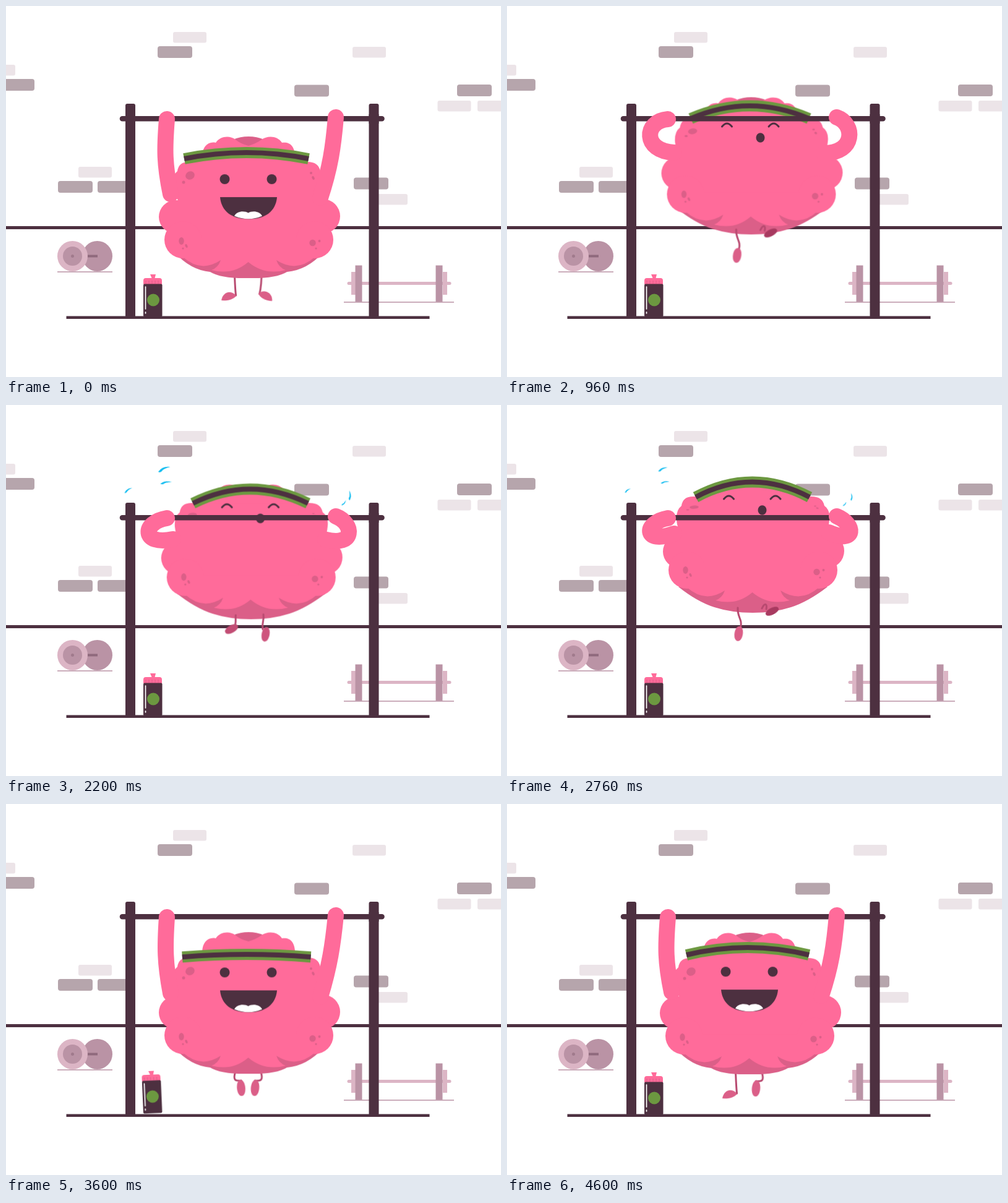
An HTML page without scripts that plays this animation: 800 by 600 pixels, repeating every 4640 ms.

```html
<!DOCTYPE html>
<html lang="en">
<head>
<meta charset="utf-8">
<title>Pull-ups</title>
<style>
  html, body { margin: 0; width: 100%; height: 100%; overflow: hidden; background: #fff; }
  svg { display: block; width: 800px; height: 600px; }
  .ink { fill: #4d3040; }
  .pink { fill: #ff6b9a; }
  .rose { fill: #db5f88; }
  .mauve { fill: #ba93a5; }
  .pale { fill: #dcb5c5; }
  .line { fill: none; stroke: #4d3040; }
  .limb { fill: none; stroke: #b84a70; stroke-width: 3; stroke-linecap: round; }
  .arm { fill: none; stroke: #ff6b9a; stroke-width: 26; stroke-linecap: round; }
  .anim { animation: 4.64s linear infinite; }

  .body { animation-name: body; }
  @keyframes body {
    0%, 100% { transform: none; }
    5% { transform: translate(0, 12px); }
    13.4% { transform: translate(0, 13px); animation-timing-function: ease-in-out; }
    18.1% { transform: translate(2.5px, -66px); }
    20.69% { transform: translate(2.5px, -70.5px); }
    35.34% { transform: translate(2.5px, -83px); }
    59.48% { transform: translate(5px, -104px); }
    62.5% { transform: translate(5px, -107px); animation-timing-function: ease-in-out; }
    67.5% { transform: translate(0, 40px); }
    70.69% { transform: translate(0, 35px); animation-timing-function: ease-in-out; }
    78% { transform: translate(0, -4px); animation-timing-function: ease-in-out; }
    86.21% { transform: translate(0, 9.5px); animation-timing-function: ease-in-out; }
    95% { transform: translate(0, -5px); }
    99.14% { transform: translate(0, -3px); }
  }

  .face { animation-name: face; }
  @keyframes face {
    0%, 100%, 70.69% { transform: none; }
    5%, 13.4%, 86.21% { transform: translate(0, 16px); }
    18.1%, 20.69% { transform: translate(1.5px, -15.5px); }
    35.34% { transform: translate(1.5px, -19px); }
    59.48%, 62.5% { transform: translate(2px, -25px); }
    67.5% { transform: translate(0, 5px); }
    78% { transform: translate(0, -4px); }
    95% { transform: translate(0, -8px); }
    99.14% { transform: translate(0, -6px); }
  }

  .band { animation-name: band; }
  @keyframes band {
    0%, 100%, 67.5%, 70.69% { d: path("M288 247Q389 227 489 247"); }
    5%, 13.4%, 86.21% { d: path("M281 256.5Q389 262.5 497 256.5"); }
    18.1%, 20.69% { d: path("M294.5 252.5Q389.5 211.5 485.5 252.5"); }
    35.34% { d: path("M296.5 252Q389.5 209 484.5 252"); }
    59.48%, 62.5% { d: path("M300 253Q391 204 484 253"); }
    95%, 99.14% { d: path("M290 247Q389 223 488 247"); }
  }

  .crown { animation-name: crown; transform-origin: 392px 211px; }
  @keyframes crown {
    0%, 67.5%, 78%, 95%, 100% { transform: none; }
    5%, 13.4%, 86.21% { transform: scale(1.05, 1.15); }
    20.69% { transform: translate(0, 7px); }
    35.34% { transform: translate(0, 8.5px); }
    59.48%, 62.5% { transform: translate(0, 13px); }
  }

  .belly { animation-name: belly; }
  @keyframes belly {
    0%, 13.4%, 67.5%, 78%, 95%, 100% { transform: none; }
    20.69% { transform: translate(0, -3px); }
    35.34% { transform: translate(0, -4.5px); }
    59.48%, 62.5% { transform: translate(0, -7px); }
    86.21% { transform: translate(0, 1.5px); }
  }

  .spots { animation-name: spots; }
  @keyframes spots {
    0%, 13.4%, 67.5%, 78%, 95%, 100% { transform: none; }
    20.69% { transform: translate(0, -5px); }
    35.34% { transform: translate(0, -7.5px); }
    59.48%, 62.5% { transform: translate(0, -9px); }
    86.21% { transform: translate(0, 2px); }
  }

  .brow { animation-name: brow; transform-origin: 392px 271px; }
  @keyframes brow {
    0%, 13.4%, 67.5%, 100% { transform: none; }
    20.69% { transform: scaleY(.7); }
    35.34% { transform: scaleY(.55); }
    59.48%, 62.5% { transform: translate(0, -3px) scaleY(.4); }
  }

  .under { animation-name: under; }
  @keyframes under {
    0%, 13.4%, 67.5%, 100% { d: path("M272 398Q298 427 330 430Q348 441 392 440Q436 441 454 430Q487 427 513 398Z"); }
    18.1%, 62.5% { d: path("M272 398Q302 422 330 431Q358 440 392 440Q426 440 454 431Q482 422 513 398Z"); }
  }

  .left { animation-name: left; }
  @keyframes left {
    0%, 78%, 95%, 99.14%, 100% { d: path("M260 183C256 232 256 256 266 304"); }
    5%, 13.4%, 86.21% { d: path("M260 183C255 235 255 262 268 314"); }
    18.1%, 20.69% { d: path("M260 183C221 186 219 235 270 237"); }
    35.34% { d: path("M260 183C219 189 217 230 270 226"); }
    59.48%, 62.5% { d: path("M260 183C221 190 219 226 270 208"); }
    67.5%, 70.69% { d: path("M260 183C268 225 270 265 266 340"); }
  }

  .right { animation-name: right; }
  @keyframes right {
    0%, 78%, 95%, 99.14%, 100% { d: path("M533 180C529 228 524 262 508 310"); }
    5%, 13.4%, 86.21% { d: path("M533 180C531 225 526 264 508 319"); }
    18.1%, 20.69% { d: path("M533 180C562 190 564 238 512 238"); }
    35.34% { d: path("M533 180C562 190 564 234 512 229"); }
    59.48%, 62.5% { d: path("M533 180C562 192 566 226 520 206"); }
    67.5%, 70.69% { d: path("M533 180C517 220 509 250 509 340"); }
  }

  .smile, .strain, .dangle, .kick, .tuck { animation-timing-function: step-end; }
  .smile { animation-name: smile; }
  @keyframes smile { 0%, 76%, 100% { opacity: 1; } 11% { opacity: 0; } }
  .strain { animation-name: strain; }
  @keyframes strain { 0%, 76%, 100% { opacity: 0; } 11% { opacity: 1; } }
  .dangle { animation-name: dangle; }
  @keyframes dangle { 0%, 74%, 100% { opacity: 1; } 15.5% { opacity: 0; } }
  .kick { animation-name: kick; }
  @keyframes kick { 0%, 64%, 100% { opacity: 0; } 15.5% { opacity: 1; } }
  .tuck { animation-name: tuck; }
  @keyframes tuck { 0%, 74%, 100% { opacity: 0; } 64% { opacity: 1; } }

  .foot { d: path("M0 -12C9 -12 9 12 0 12C-9 12 -9 -12 0 -12"); fill: #db5f88; }

  .shin { animation-name: shin; }
  @keyframes shin {
    0%, 95%, 100% { d: path("M369 425C370 445 370 455 371.5 468"); }
    99.14% { d: path("M369 425C370 445 370 455 371.5 471"); }
    5%, 13.4%, 78%, 86.21% { d: path("M371 436C366 451 371 452 380 451"); }
  }
  .rest { animation-name: rest; }
  @keyframes rest {
    0%, 95%, 100% { d: path("M-1 -12C6 -5 7 4 6 12C-9 9 -11 -5 -1 -12"); transform: translate(360px, 470px) rotate(90deg); }
    99.14% { d: path("M-1 -12C6 -5 7 4 6 12C-9 9 -11 -5 -1 -12"); transform: translate(360px, 473px) rotate(90deg); }
    5%, 13.4%, 78%, 86.21% { d: path("M0 -13C9 -13 9 13 0 13C-9 13 -9 -13 0 -13"); transform: translate(380px, 463px) rotate(-5deg); }
  }

  /* Legs paddle on a 450 ms beat while climbing */
  .shinL { animation-name: shinL; }
  @keyframes shinL {
    0%, 20.69%, 30.39%, 40.09%, 49.78%, 59.48%, 100% { d: path("M368 432C367 448 376 450 372.5 464"); }
    16%, 25.6%, 35.34%, 45%, 54.7%, 64% { d: path("M367 435C366 426 361 426 360 439"); }
  }
  .footL { animation-name: footL; }
  @keyframes footL {
    0%, 20.69%, 30.39%, 40.09%, 49.78%, 59.48%, 100% { transform: translate(369.5px, 474px) rotate(8deg); fill: #db5f88; }
    16%, 25.6%, 35.34%, 45%, 54.7%, 64% { transform: translate(351.5px, 437px) rotate(115deg) scale(.8, .9); fill: #a83a60; }
  }
  .shinR { animation-name: shinR; }
  @keyframes shinR {
    0%, 20.69%, 30.39%, 40.09%, 49.78%, 59.48%, 100% { d: path("M407 433C411 424 416 424 414 434"); }
    16%, 25.6%, 35.34%, 45%, 54.7%, 64% { d: path("M408 432C414 432 414 440 414 453"); }
    17.5%, 27.2%, 36.9%, 46.6%, 56.3% { d: path("M414 432C415 448 407 450 410 464"); }
  }
  .footR { animation-name: footR; }
  @keyframes footR {
    0%, 20.69%, 30.39%, 40.09%, 49.78%, 59.48%, 100% { transform: translate(423.5px, 437.5px) rotate(63deg) scale(.8, .95); fill: #a83a60; }
    16%, 25.6%, 35.34%, 45%, 54.7%, 64% { transform: translate(425.5px, 451px) rotate(12deg) scale(1.35, 1.55); fill: #a83a60; }
    17.5%, 27.2%, 36.9%, 46.6%, 56.3% { transform: translate(413px, 474px) rotate(-8deg); fill: #db5f88; }
  }

  .bottle { animation-name: bottle; transform-origin: 237px 502px; }
  @keyframes bottle {
    0%, 67.5%, 95%, 100% { transform: none; animation-timing-function: ease-out; }
    70.69% { transform: translate(0, -19px); animation-timing-function: ease-in; }
    73.5% { transform: none; }
    76% { transform: translate(0, -5px) rotate(-3deg); }
    79% { transform: rotate(-2deg); }
    86.21% { transform: rotate(2deg); }
    91% { transform: rotate(-1deg); }
  }

  .sweat path { fill: #14bdf0; d: path("M-10 4Q-3 -6 10 -4Q-2 -1 -4 3Q-7 6 -10 4"); }
  .spray { animation-name: spray; }
  @keyframes spray {
    0%, 30%, 42.1%, 54.2%, 100% { transform: translate(30px, 0) scale(0); }
    35.34%, 47.4%, 59% { transform: none; }
    38%, 50%, 61% { transform: translate(-16px, 0) scale(0); }
  }
  .burst { animation-name: burst; }
  @keyframes burst {
    0%, 66%, 100% { transform: translate(30px, 20px) scale(0); }
    70.69% { transform: none; }
    75% { transform: translate(-16px, -8px) scale(0); }
  }
</style>
</head>
<body>
<svg viewBox="0 0 800 600">
  <defs>
    <rect id="brick" width="56" height="19" rx="4"/>
    <rect id="block" width="54" height="17.5" rx="3"/>
  </defs>

  <g fill="#b6a5ac">
    <use href="#brick" x="245" y="65"/><use href="#brick" x="-10" y="118"/>
    <use href="#brick" x="466" y="127.5"/><use href="#brick" x="729" y="127"/>
    <use href="#brick" x="84" y="283"/><use href="#brick" x="148" y="283"/>
    <use href="#brick" x="562" y="277.5"/>
  </g>
  <g fill="#ece4e8">
    <use href="#block" x="270" y="42"/><use href="#block" x="560" y="66"/>
    <use href="#block" x="-39" y="95"/><use href="#block" x="697.5" y="153"/>
    <use href="#block" x="762" y="153"/><use href="#block" x="117" y="260"/>
    <use href="#block" x="595" y="304"/>
  </g>

  <path class="line" stroke-width="5" d="M0 358.5H800"/>

  <g>
    <circle class="mauve" cx="147.5" cy="404.5" r="24.5"/>
    <path d="M131 404.5H148" stroke="#8f6a7d" stroke-width="4"/>
    <circle class="pale" cx="107.5" cy="404.5" r="24.5"/>
    <circle class="mauve" cx="107.5" cy="404.5" r="15.5"/>
    <circle cx="107.5" cy="404.5" r="2.5" fill="#a07a8c"/>
    <path d="M83 430H172M546 479H724" stroke="#ba93a5" stroke-width="1.6"/>
    <path class="pale" d="M558 430h7v37h-7zM706 430h7v37h-7z"/>
    <path d="M554 448.5H717" stroke="#dcb5c5" stroke-width="5" stroke-linecap="round"/>
    <path class="mauve" d="M564.5 419.5h11v59h-11zM694.5 419.5h11v59h-11z"/>
  </g>

  <g class="ink">
    <rect x="193" y="158" width="16" height="346" rx="3"/>
    <rect x="586.5" y="158" width="16" height="346" rx="3"/>
  </g>

  <g class="anim bottle">
    <path class="pink" d="M233 434H242L240.5 440H248Q252 440 252 444V450H222V444Q222 440 226 440H235.500Z"/>
    <path d="M226 444v5m5-5v5m5-5v5m5-5v5m5-5v5" stroke="#db5f88"/>
    <rect class="ink" x="222" y="449.500" width="30.500" height="53" rx="2"/>
    <path d="M225.500 454V490M225.500 495v2" stroke="#fff" stroke-width="1.700" stroke-linecap="round"/>
    <circle cx="238" cy="475.500" r="10" fill="#6c9840"/>
  </g>
  <path class="line" stroke-width="4.500" d="M97.500 503.700H684.500"/>

  <g class="anim body">
    <g class="anim dangle">
      <g id="leg"><path class="limb anim shin"/><path class="foot anim rest"/></g>
      <use href="#leg" transform="translate(782.500) scale(-1 1)"/>
    </g>

    <g class="anim crown">
      <ellipse class="rose" cx="392" cy="226" rx="34" ry="15"/>
      <path class="pink" d="M318 252C314 230 325 218 339 221C346 210 362 209 371 216Q379 223 392 226Q405 222 413 216C423 209 439 210 446 221C460 219 469 228 467 252Z"/>
    </g>

    <path class="rose anim under"/>
    <path class="rose" d="M271 288Q269 300 276 306L283 280ZM514 288Q516 300 509 306L502 280Z"/>
    <path class="pink" d="M298 252Q392 238 487 252Q505 252 508 267Q518 274 516 290Q515 304 508 312H512A27 27 0 0 1 512 368L490 402H295L274 368A27 27 0 0 1 274 314H278Q270 304 269 290Q268 274 277 267Q279 251 298 252Z"/>
    <g class="anim belly pink">
      <circle cx="286" cy="378" r="30"/><circle cx="499" cy="378" r="30"/>
      <path d="M286 375V406Q315 432 347 411Q343 423 332 427Q366 436 391.500 414Q418 436 452 427Q441 423 437 411Q470 432 499 406V375Z"/>
    </g>

    <g class="anim brow rose">
      <ellipse cx="297.500" cy="274" rx="7.500" ry="6.500" transform="rotate(-25 297.500 274)"/>
      <circle cx="287" cy="285" r="2.500"/><circle cx="493" cy="270" r="2"/>
      <ellipse cx="496.500" cy="278" rx="2" ry="3" transform="rotate(-25 496.500 278)"/>
    </g>
    <g class="anim spots rose">
      <ellipse cx="283.500" cy="380" rx="4.200" ry="6"/>
      <ellipse cx="291.500" cy="388" rx="1.800" ry="3" transform="rotate(-25 291.500 388)"/>
      <circle cx="286" cy="392" r="1.600"/><circle cx="495.500" cy="383" r="5.200"/>
      <circle cx="506.500" cy="380" r="2"/><circle cx="501" cy="392" r="1.600"/>
    </g>

    <path class="anim band" fill="#ff6b9a" stroke="#6c9840" stroke-width="18"/>
    <path class="anim band line" stroke-width="8"/>

    <g class="anim face">
      <g class="anim smile">
        <g class="ink">
          <circle cx="353.500" cy="280" r="8"/><circle cx="429.500" cy="280" r="8"/>
          <path d="M346 309H438C436 332 419 344.500 392 344.500S348 332 346 309Z"/>
        </g>
        <path fill="#fff" d="M369 339.500C373 331 386 331 391.500 334.500C397 331 410 331 414 339.500Q392 349 369 339.500Z"/>
      </g>
      <g class="anim strain">
        <path class="line" stroke-width="3" stroke-linecap="round" d="M343.500 281Q351.500 271 359.500 281M419 281Q427 271 435 281"/>
        <ellipse class="ink" cx="405.500" cy="299" rx="7" ry="7.800"/>
      </g>
    </g>

    <g class="anim kick">
      <path class="limb anim shinL"/><path class="foot anim footL"/>
      <path class="limb anim shinR"/><path class="foot anim footR"/>
    </g>
    <g class="anim tuck">
      <g id="sole">
        <path class="rose" d="M323 405Q336 395 343 410L348 430Q358 438 372 430Q360 441 340 441Z"/>
        <ellipse cx="331.500" cy="422" rx="9" ry="19" fill="#a83a60" transform="rotate(-20 331.500 422)"/>
      </g>
      <use href="#sole" transform="translate(782.500) scale(-1 1)"/>
    </g>
  </g>

  <path class="line" stroke-width="8.500" stroke-linecap="round" d="M188 182.300H607.500"/>
  <path class="ink" d="M193 175h16v15h-16zM586.500 175h16v15h-16z"/>
  <path class="arm anim left"/>
  <path class="arm anim right"/>

  <g class="sweat">
    <g transform="translate(256 104)"><path class="anim spray"/></g>
    <g transform="translate(259 126) rotate(10) scale(.9 .75)"><path class="anim spray"/></g>
    <g transform="translate(198 138) rotate(-10) scale(.7)"><path class="anim spray"/></g>
    <g transform="translate(555 146) rotate(65) scale(-.75 .75)"><path class="anim spray"/></g>
    <g transform="translate(546 158) rotate(100) scale(-.5 .6)"><path class="anim spray"/></g>
    <g transform="translate(496 94)"><path class="anim burst"/></g>
    <g transform="translate(487 122) rotate(-20) scale(.8 .65)"><path class="anim burst"/></g>
    <g transform="translate(540 120) scale(-1.350 .75)"><path class="anim burst"/></g>
  </g>
</svg>
</body>
</html>
```
